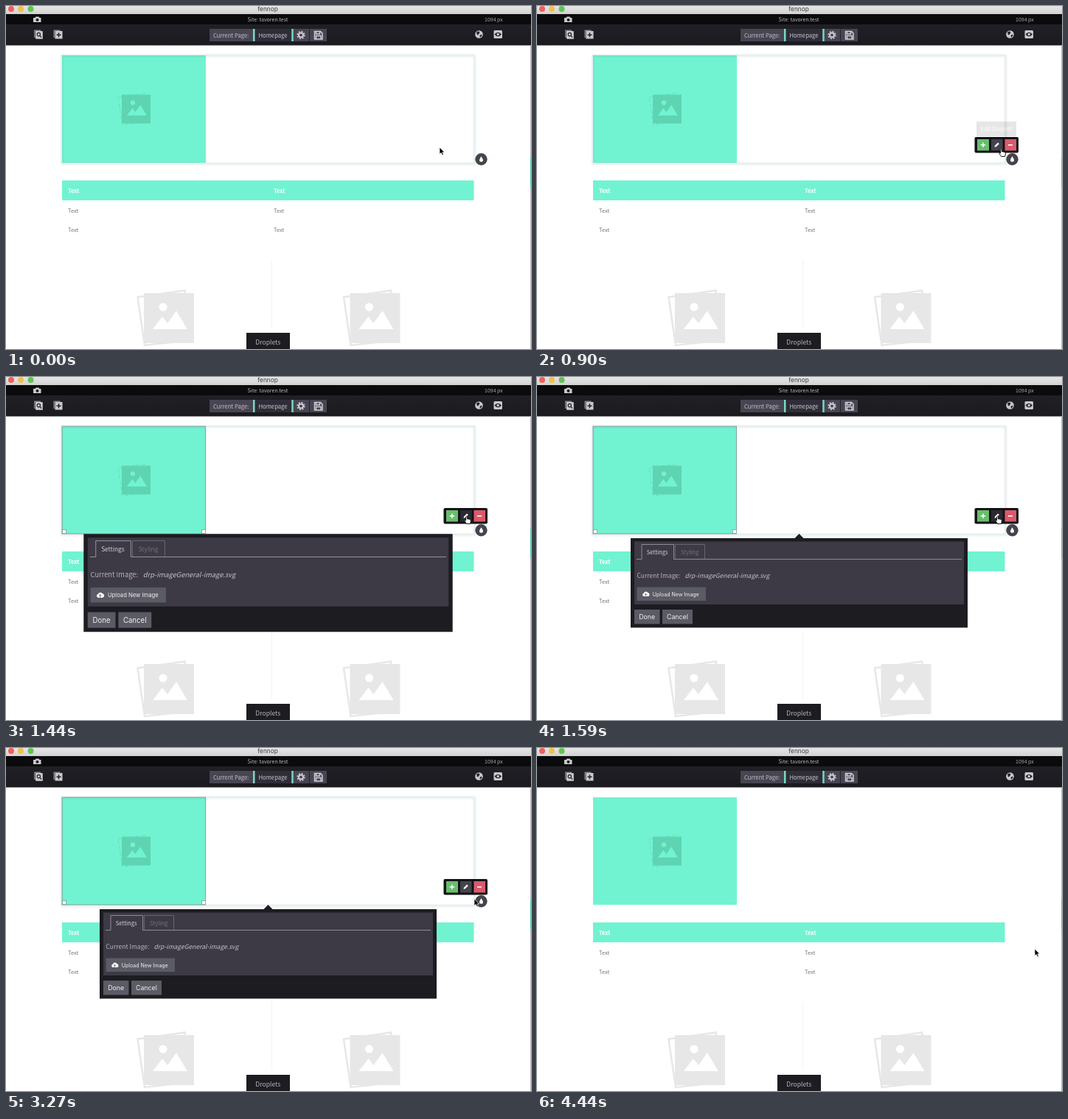
Recreate the animation shown at these times as an HTML page. Size 712 by 466 pixels, loop 4.47 s.

```html
<!DOCTYPE html>
<html lang="en">
<head>
<meta charset="utf-8">
<title>Page editor</title>
<style>
  html, body { margin: 0; width: 100%; height: 100%; overflow: hidden; background: #fff; }
  svg { display: block; width: 712px; height: 466px; }
  text { font: 7.7px "Noto Sans CJK SC", "Noto Sans CJK JP", "Noto Sans CJK", "Noto Sans", sans-serif; white-space: pre; }
  .ui { font-family: Inter, "Liberation Sans", sans-serif; }
  .mid { text-anchor: middle; }
  .row { font-size: 7.4px; fill: #777; }
  .head { font-size: 7.5px; font-weight: 700; fill: #fff; }
  #outline { filter: drop-shadow(0 1px 1.5px rgba(60, 110, 105, .35)); }
</style>
</head>
<body>
<svg viewBox="0 0 712 466">
  <defs>
    <linearGradient id="titlebar" x2="0" y2="1">
      <stop stop-color="#e6e6e6"/><stop offset="1" stop-color="#d2d2d2"/>
    </linearGradient>
    <linearGradient id="toolbar" x2="0" y2="1">
      <stop stop-color="#202026"/><stop offset="1" stop-color="#1a1a1f"/>
    </linearGradient>
    <g id="photo">
      <rect width="68" height="68"/>
      <g fill="var(--hole)">
        <circle cx="26" cy="19" r="5.5"/>
        <path d="M12 49L25 32L32 41L44 24L59 49Z"/>
      </g>
    </g>
    <path id="frame" d="M-8.500 5.500L55.500-3.500L65 64L1 71Z" fill="none"/>
  </defs>

  <rect width="712" height="466" fill="#fff"/>

  <!-- Page content -->
  <rect x="76" y="67" width="195" height="146" fill="#71f3d1"/>
  <g transform="translate(157 120.500) scale(.574)" style="--hole:#71f3d1">
    <use href="#frame" stroke="#62dcbb" stroke-width="1.500" stroke-dasharray="9 5"/>
    <use href="#photo" fill="#5ed4b2"/>
  </g>
  <rect x="76" y="237" width="558.500" height="27" fill="#71f3d1"/>
  <text class="head" x="84" y="253.500">Text</text><text class="head" x="363" y="253.500">Text</text>
  <text class="row" x="84" y="280.500">Text</text><text class="row" x="363" y="280.500">Text</text>
  <text class="row" x="84" y="307">Text</text><text class="row" x="363" y="307">Text</text>
  <path d="M360.500 345V437" stroke="#f3f3f3"/>
  <g fill="#e7e7e7" stroke-width="2.500" style="--hole:#fff">
    <g transform="translate(187 390)"><use href="#frame" stroke="#e7e7e7"/><use href="#photo"/></g>
    <g transform="translate(466.500 390)"><use href="#frame" stroke="#e7e7e7"/><use href="#photo"/></g>
  </g>

  <!-- Selection -->
  <rect id="outline" x="75.500" y="66.500" width="560" height="147" fill="none" stroke="#dfe9e8"/>
  <rect id="border" x="75.500" y="66.500" width="560" height="147" fill="none" stroke="#dfeeed"/>
  <g id="handles" stroke="#839c98">
    <rect x="76" y="67" width="194.500" height="146" fill="none" stroke-width=".9"/>
    <rect x="76.500" y="207.500" width="5" height="5" fill="#fff" stroke-width=".8"/>
    <rect x="265.500" y="207.500" width="5" height="5" fill="#fff" stroke-width=".8"/>
  </g>

  <!-- Window chrome -->
  <rect width="712" height="11" fill="url(#titlebar)"/>
  <circle cx="7" cy="4" r="4" fill="#f0605a"/>
  <circle cx="20" cy="4" r="4" fill="#f2bf4a"/>
  <circle cx="33.500" cy="4" r="4" fill="#5fc454"/>
  <text class="ui mid" x="355" y="7.300" style="font-size:8.300px" fill="#3c3c3c">fennop</text>
  <rect y="11" width="712" height="14.500" fill="#0b0b0d"/>
  <rect y="25" width="712" height="28.500" fill="url(#toolbar)"/>
  <path d="M711.500 53V466" stroke="#bbb"/>
  <rect x="711" y="206" width="1" height="40" fill="#58c9ab"/>
  <text class="mid" x="355" y="20.500" style="font-size:7px" fill="#b9b9bd">Site: tavoren.test</text>
  <text x="649" y="20.500" style="font-size:7px" fill="#a5a5a9">1094 px</text>

  <g fill="#c9c9cd">
    <path d="M37 16h2.500l1-1.500h4l1 1.500h2v6H37Z"/>
    <circle cx="42.500" cy="18.800" r="1.900" fill="#0b0b0d"/>
    <path d="M38 32.500h9V34H39.500v9H38Z M41 35h9v10h-9Z" opacity=".6"/>
    <rect x="40" y="34" width="9.500" height="10.500"/>
    <g fill="none" stroke="#222228" stroke-width="1.200"><circle cx="44.300" cy="38.600" r="2.200"/><path d="M46 40.300l2 2.200"/></g>
    <path d="M64.500 32.500h9V34H66v9h-1.500Z" opacity=".6"/>
    <rect x="66.500" y="34" width="10" height="10.500"/>
    <path d="M71.500 36.300v6M68.500 39.300h6" stroke="#222228" stroke-width="1.500"/>
    <circle cx="641.500" cy="38.500" r="5.300"/>
    <path d="M638 35.500l3-1.200 1.500 1.700-1.500 2.500-2 1zM642.500 40l2.500-1.500.5 2-2.500 2.300z" fill="#222228"/>
    <rect x="661.500" y="33" width="11.500" height="11" rx="1.500"/>
    <path d="M662.500 38.500Q667.200 33 672 38.500Q667.200 44 662.500 38.500Z" fill="#222228"/>
    <circle cx="667.200" cy="38.500" r="1.700"/>
  </g>

  <path d="M276 31h159v17H276Z" fill="#484552"/>
  <path d="M338 31h49v17h-49Z" fill="#2f2d38"/>
  <path d="M336.200 31v17M388.500 31v17" stroke="#74dcc0" stroke-width="2.400"/>
  <path d="M411.500 31v17" stroke="#24232b"/>
  <text x="281" y="42.500" fill="#c0bfc6">Current Page:</text>
  <text x="342.500" y="42.500" fill="#c8c7cd">Homepage</text>
  <g fill="none" stroke="#cfced4">
    <circle cx="400" cy="39.500" r="3" stroke-width="2"/>
    <circle cx="400" cy="39.500" r="4.900" stroke-width="1.600" stroke-dasharray="1.925"/>
    <path d="M418.500 34.500h8l2.500 2.500v8h-10.500ZM420.500 34.500v3.500h5v-3.500M420.500 45v-4.500h6.500V45" stroke-width="1.500"/>
  </g>

  <rect x="326" y="444" width="59" height="22" fill="#1c1c21"/>
  <text x="338.300" y="459.500" style="font-size:8.600px" fill="#b3b3b8">Droplets</text>

  <!-- Droplet controls -->
  <g id="tooltip">
    <rect x="596" y="157" width="54" height="20" rx="1" fill="#1c1c21"/>
    <text class="mid" x="623" y="170" fill="#fff">Edit Droplet</text>
  </g>
  <g id="tools">
    <rect x="593.500" y="178" width="59.500" height="21.500" rx="2" fill="#121216"/>
    <rect x="597" y="181" width="16" height="15.500" fill="#68be6c"/>
    <rect id="edit" x="616" y="181" width="15.500" height="15.500" fill="#45434e"/>
    <rect x="634.500" y="181" width="15.500" height="15.500" fill="#db5a6b"/>
    <path d="M605 185.500v6.500M601.700 188.800h6.600" stroke="#fff" stroke-width="1.400"/>
    <path d="M639 188.800h6" stroke="#fff" stroke-width="1.600"/>
    <path d="M620.500 191.800l.6-2.200 4-4 1.700 1.700-4 4Z" fill="#fff"/>
  </g>
  <g id="drop">
    <circle cx="644.500" cy="208.300" r="8.200" fill="#45444c"/>
    <path d="M644.500 204.300q2.500 3.600 2.500 5a2.500 2.500 0 0 1-5 0q0-1.400 2.500-5Z" fill="#fff"/>
  </g>

  <!-- Settings dialog -->
  <path id="pointer" d="M349 219.500L355.500 213L362 219.500Z" fill="#1c1c21"/>
  <g id="dialog">
    <rect x="127" y="219" width="457" height="121.500" fill="#1c1c21"/>
    <rect x="132" y="223.500" width="447" height="85.500" fill="#3d3a46"/>
    <g fill="none" stroke-width=".9">
      <path d="M187.500 247V227.500h40V247" stroke="#6b6974"/>
      <path d="M135 247.500H142V227.500h43.500v20H576" stroke="#96959d"/>
    </g>
    <text x="148.800" y="241" style="font-size:7.600px" fill="#d3d2d7">Settings</text>
    <text x="195" y="241" style="font-size:7.600px" fill="#73717c">Styling</text>
    <text x="135.500" y="273" style="font-size:8.500px" fill="#b5b3bb">Current Image:</text>
    <text x="200.500" y="273" style="font-size:8.500px;font-style:italic" fill="#c3c1c8">drp-imageGeneral-image.svg</text>
    <g fill="#5a5b64">
      <rect x="135.500" y="285.500" width="93.500" height="18.500"/>
      <rect x="132" y="316" width="34.500" height="19.500"/>
      <rect x="170" y="316" width="41" height="19.500"/>
    </g>
    <path d="M145 298a2.200 2.200 0 0 1-.2-4.300a3 3 0 0 1 5.500-.6a2.500 2.500 0 0 1 .4 4.900Z" fill="#fff"/>
    <path d="M147.500 297.500v-3M146 295.700l1.500-1.500 1.500 1.500" fill="none" stroke="#5a5b64" stroke-width=".9"/>
    <g class="buttons" fill="#f1f1f3">
      <text class="ui" x="156.800" y="297.600" style="font-size:7px">Upload New Image</text>
      <text class="ui" x="138.200" y="329" style="font-size:8.800px">Done</text>
      <text class="ui" x="176" y="329" style="font-size:8.800px">Cancel</text>
    </g>
  </g>

  <g id="cursor" stroke-linejoin="round">
    <path id="arrow" d="M0 0V9.300L2.200 7.400L3.800 10.800L5.400 10.100L3.900 6.800H6.800Z" fill="#000" stroke="#fff" stroke-width=".7"/>
    <path id="hand" d="M-.9.800Q0-.6.900.8V4Q2 3.200 2.700 4.200Q3.800 3.500 4.300 4.600Q5.700 4.200 5.800 5.600V8Q5.300 9.200 5 10.500H.2Q-1.400 8.300-2.600 6.300Q-2.600 4.800-.9 6Z" fill="#fff" stroke="#000" stroke-width=".9"/>
  </g>
</svg>
<script>
const LOOP = 4470;
const part = Object.fromEntries([...document.querySelectorAll("svg [id]")].map(el => [el.id, el]));

// Eased value between [time, value] keys
function track(t, ...keys) {
  if (t <= keys[0][0]) return keys[0][1];
  for (let i = 1; i < keys.length; i++) {
    const [t0, a] = keys[i - 1], [t1, b] = keys[i];
    if (t < t1) {
      const p = (t - t0) / (t1 - t0);
      return a + (b - a) * p * p * (3 - 2 * p);
    }
  }
  return keys[keys.length - 1][1];
}

const path = [
  [0, 588, 192], [120, 588, 192], [420, 643, 206], [560, 643, 206],
  [800, 629.5, 194], [1020, 629.5, 194], [1200, 624.5, 189], [3100, 624.5, 189],
  [3250, 635, 205], [3320, 635, 205], [3660, 675, 273]
];
const pathX = path.map(([t, x]) => [t, x]);
const pathY = path.map(([t, , y]) => [t, y]);

const fade = (el, value) => el.setAttribute("opacity", value);
const show = (el, on) => el.setAttribute("visibility", on ? "visible" : "hidden");
const move = (el, value) => el.setAttribute("transform", value);

function draw(t) {
  const hand = t >= 380 && t < 3180;
  show(part.hand, hand);
  show(part.arrow, !hand);
  move(part.cursor, `translate(${track(t, ...pathX)} ${track(t, ...pathY)})`);

  const hover = track(t, [3600, 1], [3780, 0]);
  fade(part.outline, hover);
  fade(part.drop, hover);
  fade(part.border, track(t, [4180, 1], [4380, 0]));

  const open = track(t, [430, 0], [560, 1]);
  fade(part.tools, open * hover);
  move(part.tools, `translate(0 ${(1 - open) * 8})`);
  part.edit.setAttribute("fill", t >= 1080 && t < 3200 ? "#2b2a33" : "#45434e");
  fade(part.tooltip, Math.max(0, Math.min(1, (t - 882) / 180)) * track(t, [1260, 1], [1380, 0]));

  const scale = track(t, [1320, .4], [1440, 1.095], [1570, 1], [4130, 1], [4260, .8]);
  fade(part.dialog, track(t, [1320, 0], [1400, 1], [4130, 1], [4260, 0]));
  move(part.dialog, `translate(355.5 279.7) scale(${scale}) translate(-355.5 -279.7)`);
  show(part.pointer, t >= 1570 && t < 4130);
  show(part.handles, t >= 1320 && t < 4200);
}

function tick() {
  draw(performance.now() % LOOP);
  requestAnimationFrame(tick);
}
tick();
</script>
</body>
</html>
```
